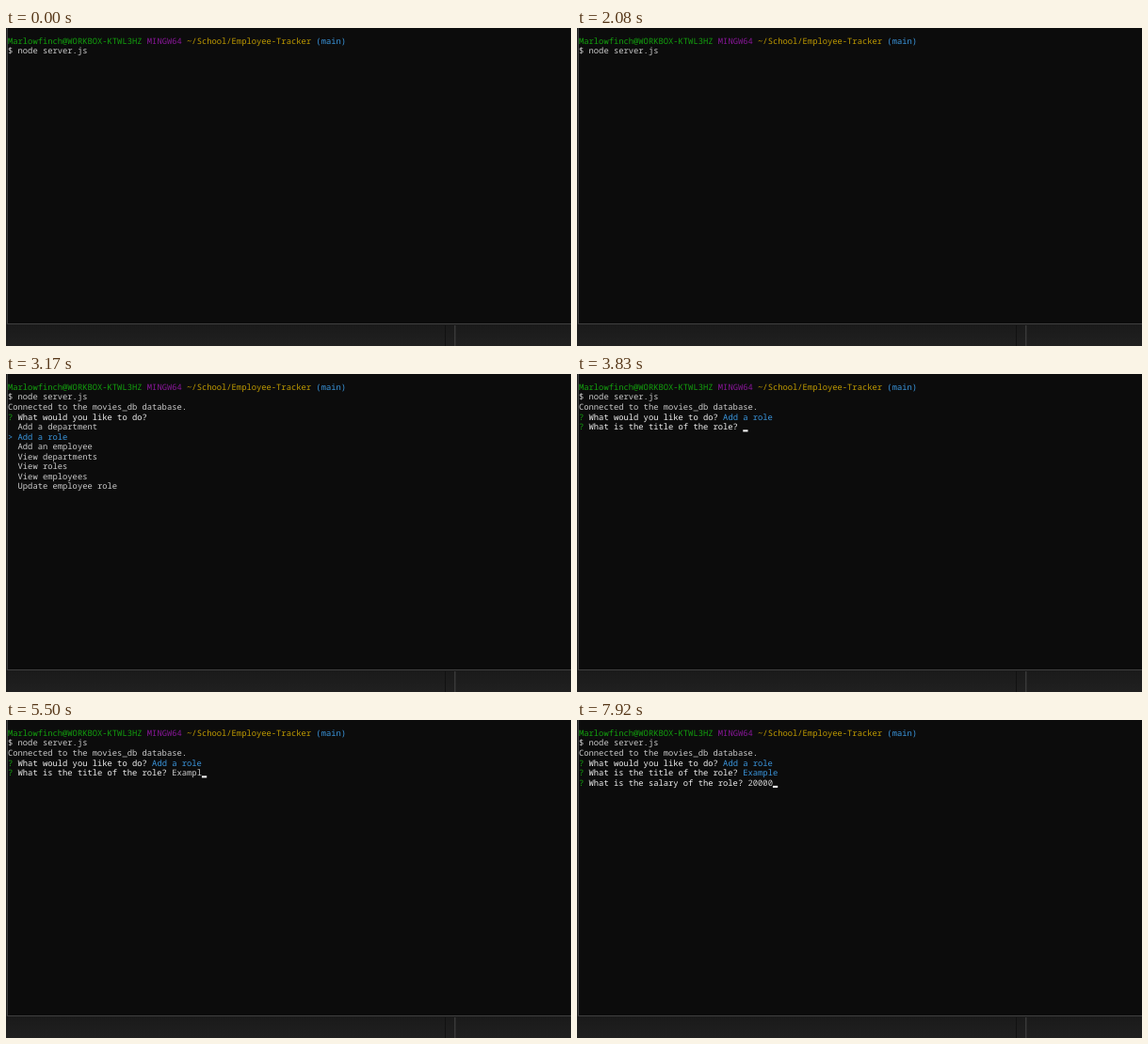
An HTML page that plays this animation: 600 by 338 pixels, repeating every 8000 ms.

```html
<!DOCTYPE html>
<html lang="en">
<head>
<meta charset="utf-8">
<title>Terminal session</title>
<style>
  html, body { margin: 0; width: 100%; height: 100%; overflow: hidden; background: #1e1e1e; }
  svg { display: block; width: 100vw; height: 100vh; }
  text {
    font: 8.8px "Noto Sans Mono", "DejaVu Sans Mono", monospace;
    white-space: pre;
    text-rendering: geometricPrecision;
  }
</style>
</head>
<body>
<svg viewBox="0 0 600 338">
  <defs>
    <linearGradient id="strip" x2="0" y2="1">
      <stop offset="0" stop-color="#1a1a1a"/>
      <stop offset="1" stop-color="#202020"/>
    </linearGradient>
  </defs>
  <rect width="600" height="338" fill="#1e1e1e"/>
  <rect y="315" width="600" height="23" fill="url(#strip)"/>
  <rect x="2" width="598" height="314" fill="#0c0c0c"/>
  <rect x="1" width="1" height="315" fill="#404040"/>
  <rect x="1" y="314" width="599" height="1" fill="#404040"/>
  <rect x="466" y="316" width="1" height="22" fill="#111"/>
  <rect x="476" y="316" width="1.5" height="22" fill="#383838"/>
  <g id="screen"></g>
</svg>
<script>
const LOOP = 8000, BLINK = 530;
const CELL = 5.28, LINE = 10.55, LEFT = 2, BASE = 16.9;
const GREEN = '#13a10e', PURPLE = '#881798', GOLD = '#c19c00';
const BLUE = '#3a96dd', GREY = '#cccccc', WHITE = '#f2f2f2';

const MENU_AT = 2250, DOWN_AT = 3000, TITLE_AT = 3580, SALARY_AT = 6130;
const TITLE_KEYS = [4650, 4830, 4990, 5150, 5310, 5440, 5560];
const SALARY_KEYS = [7150, 7330, 7460, 7590, 7720];
const CHOICES = ['Add a department', 'Add a role', 'Add an employee', 'View departments',
  'View roles', 'View employees', 'Update employee role'];

const screen = document.getElementById('screen');
let last = '';

// A line is a list of [text, colour] runs laid out on the character grid.
function drawLine(runs, row) {
  let col = 0;
  return runs.map(([str, color]) => {
    const x = LEFT + col * CELL;
    col += str.length;
    return `<text x="${x.toFixed(2)}" y="${(BASE + row * LINE).toFixed(2)}" fill="${color}">` +
      str.replace(/>/g, '&gt;') + '</text>';
  }).join('');
}

function drawCursor(lines) {
  const row = lines.length - 1;
  const col = lines[row].reduce((n, [str]) => n + str.length, 0);
  return `<rect x="${(LEFT + col * CELL).toFixed(2)}" y="${(BASE + row * LINE + 0.2).toFixed(2)}" ` +
    `width="${CELL}" height="2.1" fill="${WHITE}"/>`;
}

const ask = (question, ...answer) => [['? ', GREEN], [question + ' ', WHITE], answer];
const typed = (str, keys, t) => str.slice(0, keys.filter(k => k <= t).length);

// The cursor lights up on each key press and then blinks.
function blinkOn(t, start, keys) {
  const since = Math.max(start, ...keys.filter(k => k <= t));
  return Math.floor((t - since) / BLINK) % 2 === 0;
}

function render(t) {
  const lines = [
    [['Marlowfinch@WORKBOX-KTWL3HZ ', GREEN], ['MINGW64 ', PURPLE],
      ['~/School/Employee-Tracker ', GOLD], ['(main)', BLUE]],
    [['$ node server.js', GREY]]
  ];
  let cursor = false;

  if (t < MENU_AT) {
    cursor = t >= 250 && blinkOn(t, 250, []);
  } else {
    lines.push([['Connected to the movies_db database.', GREY]]);
    const todo = 'What would you like to do?';
    if (t < TITLE_AT) {
      const picked = t < DOWN_AT ? 0 : 1;
      lines.push(ask(todo, picked ? '' : '(Use arrow keys)', GREY));
      CHOICES.forEach((name, i) =>
        lines.push([[(i === picked ? '> ' : '  ') + name, i === picked ? BLUE : GREY]]));
    } else {
      const done = t >= SALARY_AT;
      lines.push(ask(todo, CHOICES[1], BLUE));
      lines.push(ask('What is the title of the role?',
        typed('Example', TITLE_KEYS, t), done ? BLUE : GREY));
      if (done) {
        lines.push(ask('What is the salary of the role?', typed('20000', SALARY_KEYS, t), GREY));
      }
      cursor = done ? blinkOn(t, SALARY_AT, SALARY_KEYS) : blinkOn(t, TITLE_AT, TITLE_KEYS);
    }
  }

  const html = lines.map(drawLine).join('') + (cursor ? drawCursor(lines) : '');
  if (html !== last) screen.innerHTML = last = html;
}

const start = performance.now();
function tick() {
  render((performance.now() - start) % LOOP);
  requestAnimationFrame(tick);
}
tick();
</script>
</body>
</html>
```
